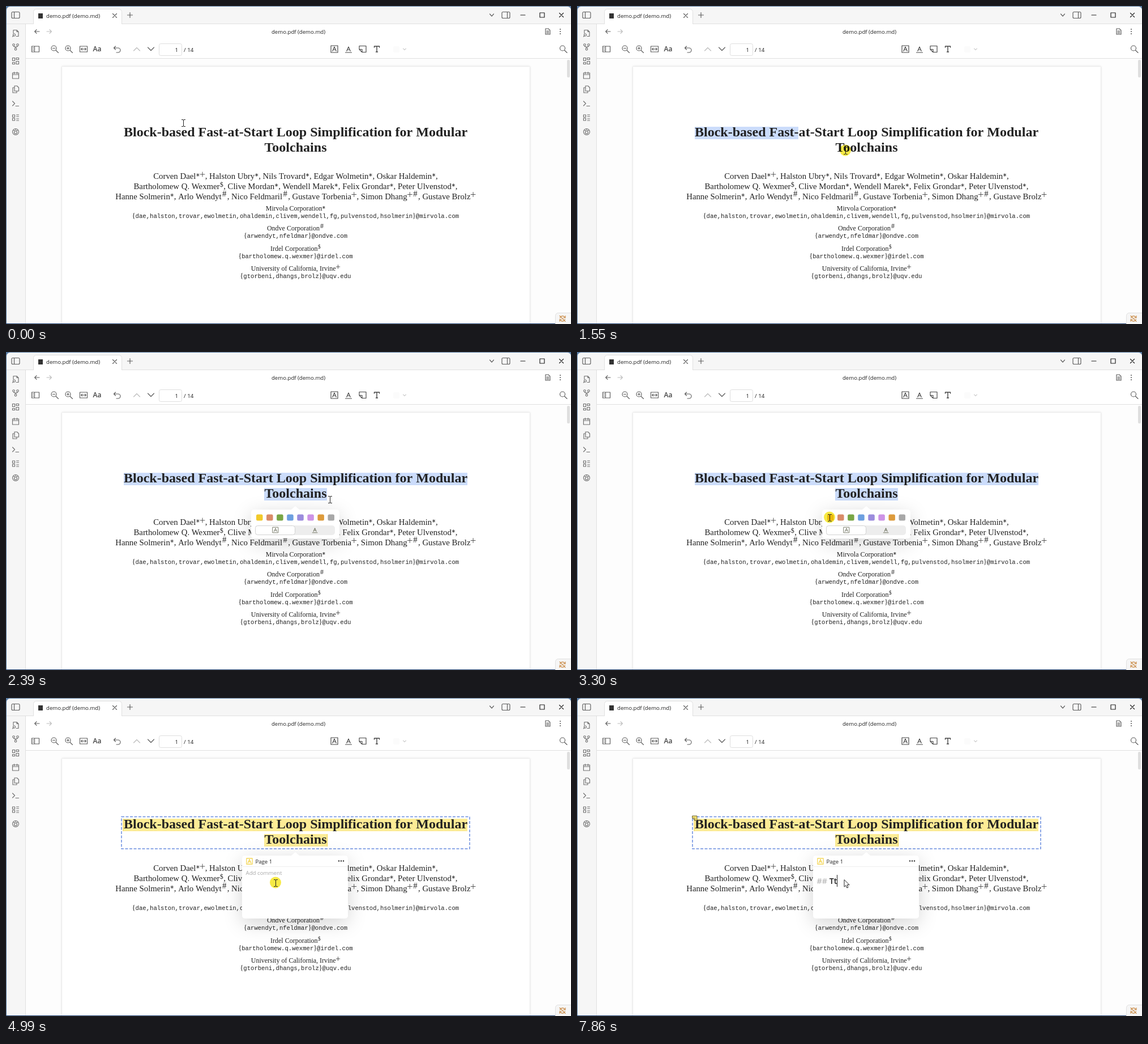
These frames come from a looping animation (998x561 px, 8000 ms). An HTML page with a canvas:

```html
<!DOCTYPE html>
<html lang="en">
<head>
<meta charset="utf-8">
<title>PDF annotation demo</title>
<style>
html, body { margin: 0; width: 100%; height: 100%; overflow: hidden; background: #fff; }
canvas { display: block; width: 998px; height: 561px; }
</style>
</head>
<body>
<canvas id="stage" width="998" height="561"></canvas>
<script>
const c = document.getElementById('stage').getContext('2d');
const LOOP = 8000, TAU = Math.PI * 2;
const SERIF = '"Liberation Serif", serif';
const MONO = '"Liberation Mono", monospace';
const UI = '"Open Sans", "Noto Sans", sans-serif';
const MID = 511.5;

function text(s, x, y, font, color = '#222', align = 'left') {
  c.font = font;
  c.fillStyle = color;
  c.textAlign = align;
  c.fillText(s, x, y);
}
function width(s, font) {
  c.font = font;
  return c.measureText(s).width;
}
function rect(x, y, w, h, color) {
  c.fillStyle = color;
  c.fillRect(x, y, w, h);
}
function box(x, y, w, h, r, fill, stroke) {
  c.beginPath();
  c.roundRect(x, y, w, h, r);
  if (fill) { c.fillStyle = fill; c.fill(); }
  if (stroke) { c.strokeStyle = stroke; c.lineWidth = 1; c.stroke(); }
}
function disc(x, y, r, color) {
  c.beginPath();
  c.arc(x, y, r, 0, TAU);
  c.fillStyle = color;
  c.fill();
}
function icon(d, x, y, color = '#5c5c5c', w = 1.15, fill) {
  const p = new Path2D(d);
  c.save();
  c.translate(x, y);
  c.lineCap = c.lineJoin = 'round';
  if (fill) { c.fillStyle = fill; c.fill(p); }
  c.strokeStyle = color;
  c.lineWidth = w;
  c.stroke(p);
  c.restore();
}

const square = (x, y, w, h = w) => `M${x} ${y}h${w}v${h}h${-w}z`;
const ring = (x, y, r) => `M${x - r} ${y}a${r} ${r} 0 1 0 ${2 * r} 0a${r} ${r} 0 1 0 ${-2 * r} 0`;
const LENS = ring(-1.5, -1.5, 4.5) + 'M2 2L6.5 6.5';
const PANEL = 'M-5-5.5h10q2 0 2 2v7q0 2-2 2h-10q-2 0-2-2v-7q0-2 2-2z';
const CROSS = 'M-3.5-3.5l7 7M3.5-3.5l-7 7';
const DOWN = 'M-3.5-2L0 2l3.5-4';
const BACK = 'M4 0h-8M-1-3.3L-4.3 0L-1 3.3';
const FRAME = square(-6, -6, 12);
const LETTER = 'M-3.2 3.5L0-4L3.2 3.5M-2.1 1h4.2';

// Superscript marks and their advance in em
const MARKS = { '*': .47, '+': .63, '#': .68, '$': .45 };

function mark(ch, x, y, s) {
  const cx = x + MARKS[ch] * s / 2;
  if (ch === '*') {
    for (let i = 0; i < 3; i++) {
      const a = Math.PI * (.5 + i / 3), dx = Math.cos(a) * s * .17, dy = Math.sin(a) * s * .17;
      icon(`M${-dx} ${-dy}L${dx} ${dy}`, cx, y - s * .47, '#333', .9);
    }
  } else if (ch === '+') {
    const r = s * .27;
    icon(`M${-r} 0H${r}M0 ${-r}V${r}`, cx, y - s * .54, '#333', .8);
  } else {
    text(ch, cx, y - s * .3, `${s * (ch === '#' ? 1 : .78)}px ${SERIF}`, '#222', 'center');
  }
}
function marked(s, y, size) {
  const font = `${size}px ${SERIF}`;
  const parts = s.split(/([*+#$])/).filter(Boolean);
  const wide = p => MARKS[p] ? MARKS[p] * size : width(p, font);
  let x = MID - parts.reduce((sum, p) => sum + wide(p), 0) / 2;
  for (const p of parts) {
    if (MARKS[p]) mark(p, x, y, size);
    else text(p, x, y, font);
    x += wide(p);
  }
}
function mail(s, y) {
  const parts = s.split(/([{}])/).filter(Boolean);
  const font = p => /[{}]/.test(p) ? `12px ${SERIF}` : `10.6px ${MONO}`;
  let x = MID - parts.reduce((sum, p) => sum + width(p, font(p)), 0) / 2;
  for (const p of parts) {
    text(p, x, y, font(p));
    x += width(p, font(p));
  }
}

function drawFrame() {
  rect(0, 0, 998, 561, '#55789f');
  rect(0, 560, 998, 1, '#1d3f73');
  box(1, 1, 997, 559, [6, 6, 0, 0], '#f6f6f6');
  rect(35, 32, 963, 528, '#fff');
  rect(1, 31, 997, 1, '#e0e0e0');
  rect(34, 31, 1, 529, '#e0e0e0');
  box(48.5, 5.5, 156, 27, [5, 5, 0, 0], '#fff', '#e0e0e0');
  rect(47, 32, 160, 2, '#fff');

  icon(PANEL + 'M-2.5-5.5v11', 17, 16);
  rect(57, 13, 8, 9, '#333');
  text('demo.pdf (demo.md)', 71, 21, `9.6px ${UI}`);
  icon(CROSS, 192, 17);
  icon('M-4.5 0h9M0-4.5v9', 219, 16);
  icon(DOWN, 858, 16);
  icon(PANEL + 'M2.5-5.5v11', 883, 16);
  icon('M-4 0h8', 913, 16, '#222', 1.2);
  icon(square(-4, -4, 8), 947, 16, '#222', 1.2);
  icon(CROSS, 981, 16, '#222', 1.2);

  icon(BACK, 55, 45);
  c.save();
  c.translate(76, 45);
  c.scale(-1, 1);
  icon(BACK, 0, 0, '#bbb');
  c.restore();
  text('demo.pdf (demo.md)', 516.5, 49, `9.6px ${UI}`, '#222', 'center');
  icon('M-4-5h5l3 3v7h-8zM-2-1h4M-2 1h4M-2 3h4', 957, 45);
  for (const dy of [-4, 0, 4]) disc(979, 45 + dy, 1, '#555');
}

function drawRibbon() {
  const col = '#707070';
  icon('M-4 0v-5.5h6l3 3v8h-4M2-5.5v3h3' + ring(-2.5, 3, 2) + 'M-4 4.5l-1.5 1.5', 17, 48, col);
  icon(ring(-3.5, -3.5, 1.8) + ring(3.5, -3.5, 1.8) + ring(0, 4, 1.8) + 'M-3.5-1.7q0 2 3.5 2t3.5-2M0 .3v2', 17, 72, col);
  icon(square(-5.5, -5.5, 4, 5) + square(1, -5.5, 4.5, 3) + square(-5.5, 2.5, 4, 3) + square(1, .5, 4.5, 5), 17, 97, col);
  icon(square(-5.5, -4.5, 11, 10) + 'M-5.5-1.5h11M-2.5-6v3M2.5-6v3', 17, 122.5, col);
  icon('M-2-6h4.5l3 3v6h-7.5zM-2-3h-3v9h7v-3', 17, 147, col);
  icon('M-5.5-4l4 4l-4 4M0 4.5h5.5', 17, 172, col);
  icon(square(-5.5, -5, 4) + square(-5.5, 1, 4) + 'M1.5-5h4M1.5-2h4M1.5 2h4M1.5 5h4', 17, 197, col);
  icon(ring(0, 0, 5.5) + ring(0, 1, 2.5) + 'M-3.5-2.5h2M1.5-2.5h2M0-5.5v2', 17, 222, col);
}

function drawToolbar() {
  icon(square(-6.5, -5, 13, 10) + 'M-1.5-5v10M-4.5-2.5h1M-4.5 0h1M-4.5 2.5h1', 52, 76);
  icon(LENS + 'M-3.5-1.5h4', 86, 76);
  icon(LENS + 'M-3.5-1.5h4M-1.5-3.5v4', 111, 76);
  icon(square(-6.5, -5, 13, 10) + 'M-4 0h8M-2.5-1.8L-4.3 0l1.8 1.8M2.5-1.8L4.3 0L2.5 1.8', 137, 76);
  text('Aa', 153.5, 80, `600 12px ${UI}`, '#444');
  icon('M-2.5-6L-5.5-3L-2.5 0M-5.5-3H2a4 4 0 0 1 0 8h-3', 196, 77);
  icon('M-5.5 3L0-2.5L5.5 3', 231, 76, '#bbb');
  icon('M-5.5-3L0 2.5L5.5-3', 256, 76);
  box(270.5, 66.5, 40, 21, 3, '#fff', '#dedede');
  text('1', 304, 81, `9.8px ${UI}`, '#222', 'right');
  text('/ 14', 314, 81, `9.8px ${UI}`);
  icon(FRAME + LETTER, 580, 76, '#444');
  icon(LETTER + 'M-5.5 6h11', 605, 76, '#444');
  icon('M-6-5.5h12v11h-7l-5-5zM-1 5.5v-5h-5', 630, 76, '#444');
  icon('M-4.5-3v-2h9v2M0-5v10M-1.5 5h3', 655, 76, '#444', 1.4);
  box(684, 71, 11, 11, 2, '#fbfbfb');
  icon('M-2.5-1L0 1.5l2.5-2.5', 704, 76, '#d0d0d0');
  icon(LENS, 984.5, 76);
  rect(35, 92, 963, 1, '#e0e0e0');
}

function drawPage(t) {
  rect(35, 93, 963, 467, '#fdfdfd');
  c.save();
  c.beginPath();
  c.rect(35, 93, 963, 467);
  c.clip();
  c.shadowColor = 'rgba(0,0,0,.1)';
  c.shadowBlur = 4;
  box(98.5, 106.5, 827, 480, 1, '#fff');
  c.shadowColor = 'transparent';
  box(98.5, 106.5, 827, 480, 1, null, '#e9e9e9');
  c.restore();
  box(991, 95, 5, 31, 2, '#dfdfdf');

  if (t >= 1350 && t < 3370) drawSelection(t);
  if (t >= 3370) {
    rect(207, 213, 608, 22, '#fdec96');
    rect(456, 240, 111, 22, '#fdec96');
    rect(206.5, 213, 1, 22, '#f0d24a');
    rect(567, 240, 1, 22, '#f0d24a');
  }

  const head = `bold 24.05px ${SERIF}`;
  text('Block-based Fast-at-Start Loop Simplification for Modular', MID, 230, head, '#222', 'center');
  text('Toolchains', MID, 257, head, '#222', 'center');

  const author = 14.8, org = 12;
  marked('Corven Dael*+, Halston Ubry*, Nils Trovard*, Edgar Wolmetin*, Oskar Haldemin*,', 305, author);
  marked('Bartholomew Q. Wexmer$, Clive Mordan*, Wendell Marek*, Felix Grondar*, Peter Ulvenstod*,', 323, author);
  marked('Hanne Solmerin*, Arlo Wendyt#, Nico Feldmaril#, Gustave Torbenia+, Simon Dhang+#, Gustave Brolz+', 340.5, author);
  marked('Mirvola Corporation*', 361, org);
  mail('{dae,halston,trovar,ewolmetin,ohaldemin,clivem,wendell,fg,pulvenstod,hsolmerin}@mirvola.com', 374);
  marked('Ondve Corporation#', 396, org);
  mail('{arwendyt,nfeldmar}@ondve.com', 409);
  marked('Irdel Corporation$', 431.5, org);
  mail('{bartholomew.q.wexmer}@irdel.com', 444.5);
  marked('University of California, Irvine+', 466.5, org);
  mail('{gtorbeni,dhangs,brolz}@uqv.edu', 480);

  if (t >= 3920) {
    c.setLineDash([5, 2.5]);
    c.strokeStyle = '#6a8de0';
    c.lineWidth = 1.5;
    c.strokeRect(204, 209.5, 615, 56.5);
    c.setLineDash([]);
  }
  if (t >= 5460) icon('M-4-4h8v8h-4l-4-4zM0 4v-4h-4', 208, 212, '#6b6330', 1, '#f3df70');

  box(970.5, 541.5, 32, 20, [5, 0, 0, 0], '#f6f6f6', '#e0e0e0');
  icon('M-4.5-1A4.6 4.6 0 0 1 3-3.5L5-1.5M5-5v3.5H1.5M4.5 1A4.6 4.6 0 0 1-3 3.5L-5 1.5M-5 5V1.5h3.5M-5-5L5 5', 983, 551.5, '#c98a45', 1.1);
}

function drawSelection(t) {
  const blue = '#cbdcfb';
  const full = t >= 1620;
  const right = full ? 815 : t >= 1550 ? 391 : t >= 1480 ? 312 : t >= 1410 ? 240 : 208;
  rect(208, 213, right - 208, 22, blue);
  if (full) rect(456, 240, t >= 1760 ? 111 : t >= 1690 ? 76 : 44, 22, blue);
}

function popup(x, y, w, h) {
  const body = new Path2D();
  body.roundRect(x, y, w, h, 5);
  body.moveTo(504, y);
  body.lineTo(511, y - 6);
  body.lineTo(518, y);
  c.save();
  c.shadowColor = 'rgba(0,0,0,.17)';
  c.shadowBlur = 34;
  c.shadowOffsetY = 8;
  c.fillStyle = '#fff';
  c.fill(body);
  c.restore();
  box(x + .5, y + .5, w - 1, h - 1, 5, null, '#e4e4e4');
  c.fillStyle = '#fff';
  c.fill(body);
}

const SWATCHES = ['#f2ca2b', '#d98b68', '#78a646', '#6d9fe0', '#9b8cdd', '#cd93e6', '#dd9b3c', '#a8a8a8'];

function drawPalette(t) {
  c.save();
  c.globalAlpha = Math.min(1, (t - 2200) / 140 + .3);
  popup(433, 278, 156, 51);
  SWATCHES.forEach((color, i) => box(442 + i * 18.07, 286.5, 11.5, 11, 2.5, color));
  box(440, 306, 141, 17, 5, '#ededed');
  box(440.5, 306.5, 70, 16, 4, '#fff', '#d2d2d2');
  c.save();
  c.translate(476, 314);
  c.scale(.8, .8);
  icon(FRAME + LETTER, 0, 0, '#777a68', 1.2);
  icon(LETTER + 'M-5.5 6h11', 87, 0, '#777a68', 1.3);
  c.restore();
  c.restore();
}

const TYPED = [[5460, '#'], [5590, '##'], [6130, '## '], [6340, '## T'], [6530, '## Te'],
  [6730, '## Tes'], [6930, '## Test'], [7200, '## '], [7400, '## T'], [7530, '## Tte'],
  [7660, '## T'], [7860, '## Tt']];

function drawNote(t) {
  popup(417, 278, 187, 111);
  rect(418, 297, 185, 1, '#eeeeee');
  c.save();
  c.translate(430, 288);
  c.scale(.85, .85);
  icon(FRAME + LETTER, 0, 0, '#f2cf3a', 1.3);
  c.restore();
  text('Page 1', 440.5, 291.5, `9.6px ${UI}`);
  for (const dx of [-4, 0, 4]) disc(592 + dx, 287.5, 1.2, '#333');

  const now = TYPED.filter(k => k[0] <= t).pop();
  if (!now) {
    text('Add comment', 423.5, 312, `9.7px ${UI}`, '#a8a8a8');
    if (t >= 4520 && t < 4990) rect(424, 301, 1, 14, '#222');
    return;
  }
  const font = `600 14.3px ${UI}`, s = now[1];
  text(s.slice(0, 2), 423.5, 328, `14.3px ${UI}`, '#ababab');
  text(s.slice(3), 423.5 + width('## ', font), 328, font);
  rect(Math.round(423.5 + width(s, font) - .3), 312, 1, 21, '#222');
}

// Pointer path: time, x, y
const PATH = [[200, 313, 206], [480, 250, 238], [720, 205, 236], [890, 207.5, 227.5], [1280, 207.5, 227.5],
  [1550, 474, 255], [1830, 562, 261], [2130, 572, 260], [2480, 572, 260], [3160, 446, 292],
  [3370, 446, 292], [3720, 502, 249], [4060, 502, 249], [4590, 475.5, 325.5]];
const CLICKS = [[1350, 2060], [3230, 3440], [3920, 4060], [4520, 5460]];

function pointerAt(t) {
  const i = PATH.findIndex(k => k[0] > t);
  if (i < 0) return PATH[PATH.length - 1].slice(1);
  if (i === 0) return PATH[0].slice(1);
  const a = PATH[i - 1], b = PATH[i];
  const u = (t - a[0]) / (b[0] - a[0]), e = u * u * (3 - 2 * u);
  return [a[1] + (b[1] - a[1]) * e, a[2] + (b[2] - a[2]) * e];
}

function drawPointer(t) {
  if (t >= 5460) {
    icon('M0 0v12.2l2.8-2.6l2 4.4l2.2-1l-2-4.3h3.8z', 472, 321, '#222', 1, '#fff');
    return;
  }
  const step = Math.floor((t - 10) / 70) * 70 + 10;
  const [x, y] = pointerAt(step).map(Math.round);
  if (CLICKS.some(([a, b]) => t >= a && t < b)) {
    c.globalCompositeOperation = 'multiply';
    disc(x, y - .5, 10, 'rgba(246,230,36,.85)');
    c.globalCompositeOperation = 'source-over';
  }
  if (t >= 3510 && t < 4270) {
    icon('M-1 0q1-1.3 2 0v4.5q1-1 2 .2q1-.8 2 .3q1-.6 1.8.6v4q0 3-2 4h-4.5l-4-5q-.6-1.6 1-1.4l1.7 1.3z', x, y, '#222', 1, '#fff');
  } else {
    icon('M-3-6h1.5Q0-6 0-4.8Q0-6 1.5-6H3M0-4.8v9.6M-3 6h1.5Q0 6 0 4.8Q0 6 1.5 6H3', x + .5, y + .5, '#222', 1);
  }
}

function draw(t) {
  drawFrame();
  drawRibbon();
  drawToolbar();
  drawPage(t);
  if (t >= 2200 && t < 3370) drawPalette(t);
  if (t >= 3920) drawNote(t);
  drawPointer(t);
}

const start = performance.now();
function tick() {
  draw((performance.now() - start) % LOOP);
  requestAnimationFrame(tick);
}
tick();
</script>
</body>
</html>
```
